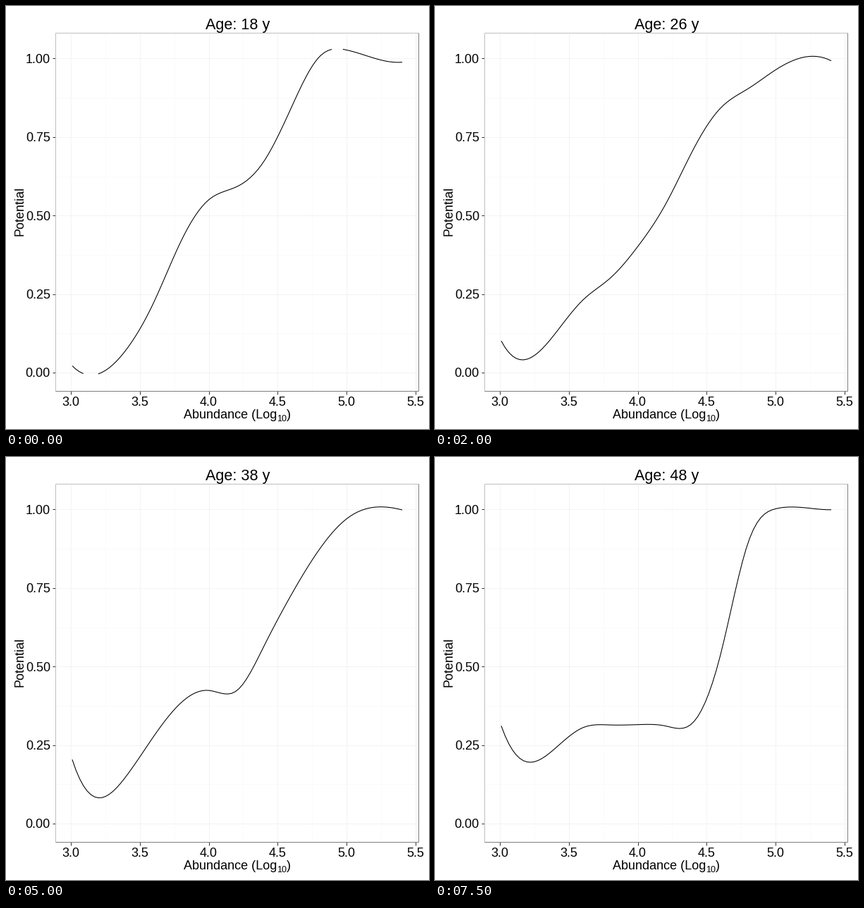
A matplotlib script that plays this animation: 600x600 px, repeating every 8000 ms.

```python
import numpy as np
import matplotlib.pyplot as plt
from matplotlib.animation import FuncAnimation

SIZE, DPI = 600, 100
PX = 72 / DPI
LEFT, RIGHT, TOP, BOTTOM = 70, 585, 38, 546

# Potential at abundance 3.0, 3.2, ... 5.4 for a few key ages
START, STEP = 3, .2
KEYS = {
    18: [.026, -.004, .072, .222, .419, .55, .591, .672, .844, 1.004, 1.027, 1.001, .988],
    22: [.083, .04, .126, .254, .341, .414, .45, .57, .763, .978, 1.016, 1.01, .994],
    30: [.136, .046, .121, .206, .26, .388, .618, .845, .92, .829, .911, .997, .993],
    34: [.167, .057, .13, .222, .288, .406, .588, .814, .897, .81, .904, .997, .993],
    38: [.218, .082, .15, .277, .385, .424, .422, .564, .729, .871, .97, 1.007, .999],
    44: [.306, .175, .222, .301, .368, .375, .33, .338, .545, .861, .99, 1.008, .999],
    48: [.324, .196, .239, .305, .314, .315, .311, .321, .536, .893, 1.002, 1.006, .999],
}
AGES = range(18, 50, 2)
LOW, HIGH = -.0066, 1.0303


def spline(y, t):
    """Not-a-knot cubic spline through y at t = 0, 1, 2, ..."""
    n = len(y)
    a = 4 * np.eye(n) + np.eye(n, k=1) + np.eye(n, k=-1)
    a[0], a[-1] = 0, 0
    a[0, :3] = a[-1, -3:] = 1, -2, 1
    m = np.linalg.solve(a, np.pad(6 * np.diff(y, 2), 1))
    i = np.clip(t.astype(int), 0, n - 2)
    u = t - i
    v = 1 - u
    return (v * y[i] + u * y[i + 1]
            + ((v**3 - v) * m[i] + (u**3 - u) * m[i + 1]) / 6)


def knots_at(age):
    """Key values blended linearly between the neighbouring key ages."""
    return np.array([np.interp(age, list(KEYS), column)
                     for column in zip(*KEYS.values())])


def px_x(v):
    return 92 + 195.5 * (v - START)


def px_y(v):
    return 520 - 445.6 * v


plt.rcParams["font.family"] = "Liberation Sans"
fig = plt.figure(figsize=(SIZE / DPI, SIZE / DPI), dpi=DPI, facecolor="white")
ax = fig.add_axes([0, 0, 1, 1])
ax.set(xlim=(0, SIZE), ylim=(SIZE, 0))
ax.axis("off")


def seg(x, y, color, z=1):
    ax.plot(x, y, color=color, lw=PX, zorder=z, solid_capstyle="butt")


def label(x, y, s, size=18, ha="center", **kw):
    return ax.text(x, y, s, fontsize=size * PX, ha=ha, va="baseline", **kw)


def vline(x, color, z):
    seg([x, x], [TOP, BOTTOM], color, z)


def hline(y, color, z):
    seg([LEFT, RIGHT], [y, y], color, z)


for v in np.arange(3.25, 5.5, .5):
    vline(px_x(v), "#fafafa", 1)
for v in np.arange(.125, 1, .25):
    hline(px_y(v), "#fafafa", 1)
for v in np.arange(3, 5.6, .5):
    vline(px_x(v), "#f3f3f3", 2)
    seg([px_x(v)] * 2, [BOTTOM, BOTTOM + 5], "#333333")
    label(px_x(v), 567.3, f"{v:.1f}")
for v in np.arange(0, 1.1, .25):
    hline(px_y(v), "#f3f3f3", 2)
    seg([LEFT - 4, LEFT], [px_y(v)] * 2, "#333333")
    label(63, px_y(v) + 6.5, f"{v:.2f}", ha="right")

vline(LEFT, "#bfbfbf", 4)
hline(TOP, "#bfbfbf", 4)
vline(RIGHT, "#7f7f7f", 4)
hline(BOTTOM, "#7f7f7f", 4)

label(252, 585, "Abundance (Log", ha="left")
label(384, 589, "10", 12.6, ha="left")
label(398, 585, ")", ha="left")
label(24.5, 290.5, "Potential", rotation=90, rotation_mode="anchor")
title = label(328.3, 33.5, "", 21.6)

xs = np.linspace(3.01, 5.404, 90)
curve, = ax.plot([], [], color="black", lw=1.07 * PX, zorder=3,
                 solid_capstyle="butt")


def update(age):
    ys = spline(knots_at(age), (xs - START) / STEP)
    ys[(ys < LOW) | (ys > HIGH)] = np.nan
    curve.set_data(px_x(xs), px_y(ys))
    title.set_text(f"Age: {age} y")
    return curve, title


anim = FuncAnimation(fig, update, frames=AGES, interval=500,
                     repeat=True, repeat_delay=0, blit=False)
plt.show()
```
